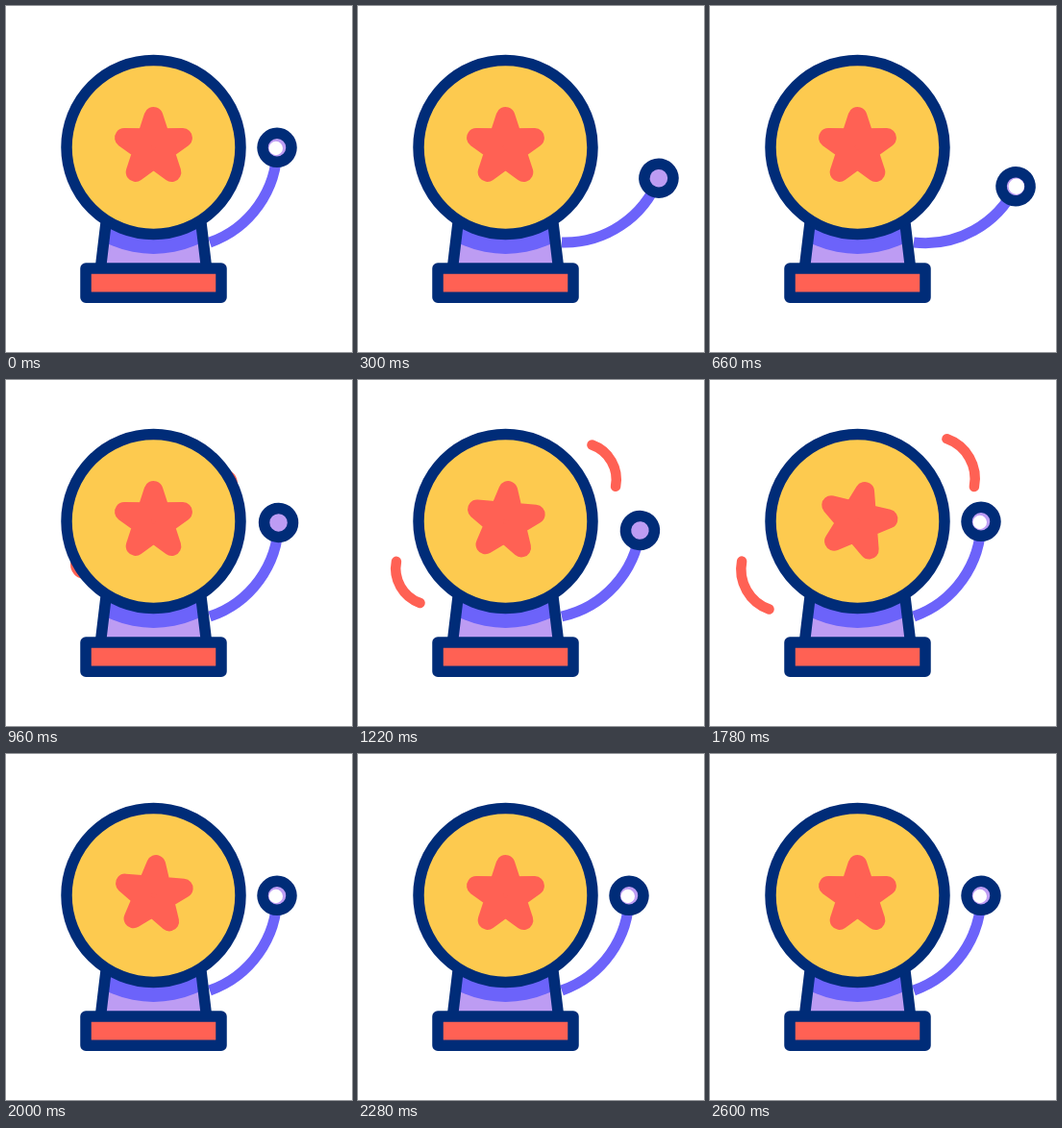
These frames come from a looping animation (360x360 px, 3.6 s). An HTML page:

```html
<!DOCTYPE html>
<html lang="en">
<head>
<meta charset="utf-8">
<title>Ringing bell</title>
<style>
  html, body { margin: 0; width: 100%; height: 100%; overflow: hidden; background: #fff; }
  svg { display: block; width: 100%; height: 100%; }
  .line { stroke: #002c78; stroke-width: 11.5; stroke-linejoin: round; }
  .wave { fill: none; stroke: #ff6154; stroke-width: 10.5; stroke-linecap: round; }
</style>
</head>
<body>
<svg viewBox="0 0 360 360">
  <defs>
    <clipPath id="neck"><path d="M104 226H203L208.5 272H98.5Z"/></clipPath>
  </defs>
  <path class="wave" id="waveR"/>
  <path class="wave" id="waveL"/>
  <g id="arm">
    <path d="M212 246A105 105 0 0 0 282 147" fill="none" stroke="#6c63fa" stroke-width="11"/>
    <circle class="line" cx="282" cy="147.3" r="15" fill="#bd9cf3"/>
  </g>
  <circle id="glint" fill="#fff"/>
  <path d="M104 226H203L208.5 272H98.5Z" fill="#bd9cf3"/>
  <circle cx="153.5" cy="147" r="111" fill="#6c63fa" clip-path="url(#neck)"/>
  <path class="line" d="M104 226L98.5 272M203 226L208.5 272" fill="none"/>
  <rect class="line" x="83" y="273" width="141" height="30.3" fill="#ff6154"/>
  <circle class="line" cx="153.5" cy="147" r="90.5" fill="#fdca4f"/>
  <path id="star" fill="#ff6154" stroke="#ff6154" stroke-width="20" stroke-linejoin="round"/>
</svg>
<script>
const LOOP = 3600, SWING = 26;
const $ = id => document.getElementById(id);
const set = (el, attrs) => { for (const k in attrs) el.setAttribute(k, attrs[k]); };
const clamp = u => Math.min(1, Math.max(0, u));
const span = (t, a, b) => clamp((t - a) / (b - a));
const smooth = u => u * u * (3 - 2 * u);
const inOut = u => u < .5 ? 4 * u ** 3 : 1 - 4 * (1 - u) ** 3;
const hop = (t, a, b) => { const u = span(t, a, b); return 4 * u * (1 - u); };

function starPath(outer, inner) {
  let d = '';
  for (let i = 0; i < 10; i++) {
    const a = (i * 36 - 90) * Math.PI / 180, r = i % 2 ? inner : outer;
    d += (i ? 'L' : 'M') + (r * Math.cos(a)).toFixed(2) + ' ' + (r * Math.sin(a)).toFixed(2);
  }
  return d + 'Z';
}
set($('star'), { d: starPath(32, 12.2) });

// The arm is pulled down, released, and bounces twice against its rest.
function armAngle(t) {
  if (t < 640) return SWING * inOut(span(t, 0, 470));
  if (t < 950) return SWING * (1 - span(t, 640, 950) ** 2);
  return 8.2 * hop(t, 950, 1340) + 2.5 * hop(t, 1340, 1730);
}

function waveScale(t) {
  if (t < 1640) return 1.02 * (1 - (1 - span(t, 900, 1630)) ** 2.6);
  return 1.02 * (1 - span(t, 1640, 1980) ** 2.6);
}

function wavePath(s, mirrored) {
  let x = 264 + 40 * (s - 1), y = 84 - 25 * (s - 1);
  let dx = 15.5 * s, dy = 27.2 * s;
  if (mirrored) { x = 308 - x; y = 299.6 - y; dx = -dx; dy = -dy; }
  const r = 48 * s;
  return `M${x - dx} ${y - dy}A${r} ${r} 0 0 1 ${x + dx} ${y + dy}`;
}

function draw(t) {
  const angle = armAngle(t);
  set($('arm'), { transform: `rotate(${angle} 212 246)` });

  const down = angle > SWING - .3, resting = t < 20 || t >= 1730;
  set($('glint'), {
    cx: down ? 318.8 : 280.8, cy: down ? 187.8 : 148, r: down ? 8.2 : 7.2,
    visibility: down || resting ? 'visible' : 'hidden'
  });

  const s = waveScale(t), visibility = s > .01 ? 'visible' : 'hidden';
  set($('waveR'), { d: wavePath(s, false), visibility });
  set($('waveL'), { d: wavePath(s, true), visibility });

  const turn = 17 * (smooth(span(t, 1010, 1610)) - smooth(span(t, 1610, 2210)));
  set($('star'), { transform: `translate(153.5 147) rotate(${turn})` });
}

const start = performance.now();
function tick() {
  draw((performance.now() - start) % LOOP);
  requestAnimationFrame(tick);
}
draw(0);
requestAnimationFrame(tick);
</script>
</body>
</html>
```
